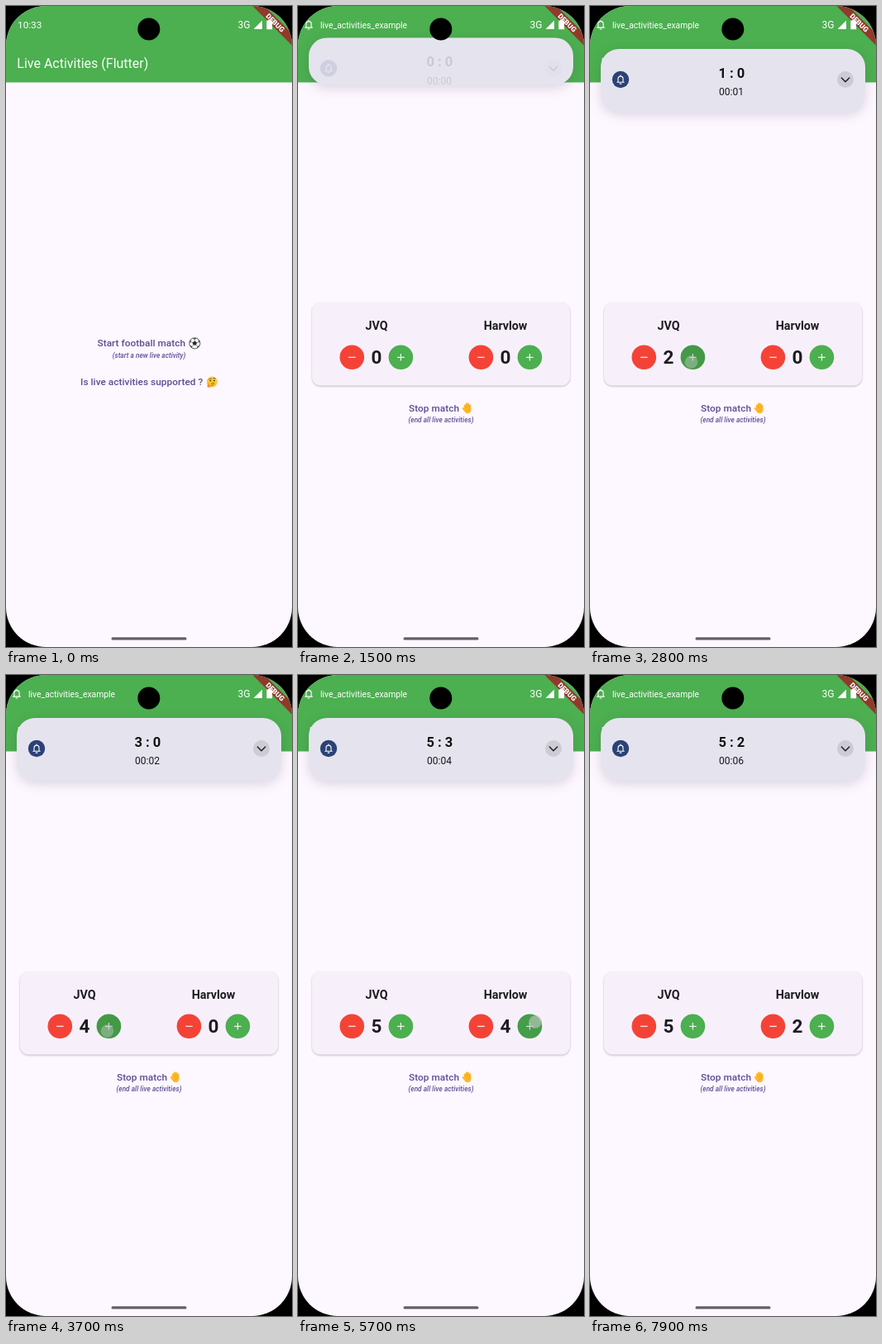
These frames come from a looping animation (346 by 776 pixels, 8000 ms). An HTML page:

```html
<!DOCTYPE html>
<html lang="en">
<head>
<meta charset="utf-8">
<title>Live score demo</title>
<style>
  html, body { margin: 0; width: 100%; height: 100%; overflow: hidden; background: #000; }
  svg { display: block; width: 100%; height: 100%; font-family: Roboto, sans-serif; }
  .white { fill: #fff; }
  .mid { text-anchor: middle; }
  .action { font-size: 11.8px; font-weight: 500; letter-spacing: .05px; fill: #5d4c94; }
  .note { font-size: 8.2px; font-weight: 500; font-style: italic; letter-spacing: .06px; fill: #5d4c94; text-anchor: middle; }
  .team { font-size: 14.3px; font-weight: 700; fill: #1d1b20; text-anchor: middle; }
  .count { font-size: 22.5px; font-weight: 700; fill: #1d1b20; text-anchor: middle; }
  .sign { stroke: #fff; stroke-width: 1.2; stroke-opacity: .9; }
  .line { fill: none; stroke-linecap: round; stroke-linejoin: round; }
  #card { filter: drop-shadow(0 1px 1px rgba(0, 0, 0, .25)); }
  #panel { filter: drop-shadow(0 4px 7px rgba(50, 35, 70, .16)); }
</style>
</head>
<body>
<svg viewBox="0 0 346 776" preserveAspectRatio="none">
  <defs>
    <clipPath id="screen"><rect width="346" height="776" rx="48"/></clipPath>
    <clipPath id="panelClip"><rect id="panelMask" x="13" y="52" width="320" height="76" rx="22"/></clipPath>
    <path id="bell" class="line" d="M-7 6H7M-5 6V-1a5 5 0 0 1 10 0V6M-1.5 9h3M0-8v2"/>
  </defs>

  <g clip-path="url(#screen)">
    <rect width="346" height="776" fill="#fdf7ff"/>
    <rect width="346" height="92.5" fill="#4caf50"/>
    <text x="13.3" y="75" font-size="16" fill="#f6fff6">Live Activities (Flutter)</text>

    <g id="home">
      <rect id="press" x="102" y="394" width="142" height="40" rx="20" fill="#65558f"/>
      <text class="action" x="110.5" y="412.3">Start football match</text>
      <g transform="translate(228.3 408.3)">
        <circle r="6.6" fill="#f4f4f4" stroke="#3b3b3f" stroke-width=".8"/>
        <path fill="#2c2c30" d="M0-2.8 2.7-.9 1.7 2.3h-3.4L-2.7-.9ZM-2.4-6.1H2.4L0-4.6ZM4.4-4.8 6.4-.6 4.6-1.6ZM6 2.5 3 6 3.2 3.7ZM-4.4-4.8-6.4-.6-4.6-1.6ZM-6 2.5-3 6-3.2 3.7Z"/>
        <path class="line" stroke="#55555a" stroke-width=".6" d="M0-2.8v-2M2.7-.9l2-.7M1.7 2.3l1.5 1.6M-1.7 2.3l-1.5 1.6M-2.7-.9l-2-.7"/>
      </g>
      <text class="note" x="173" y="425.6">(start a new live activity)</text>
      <text class="action" x="90" y="459.3">Is live activities supported ?</text>
      <g transform="translate(249.3 455)">
        <circle r="6.5" fill="#fcc932"/>
        <circle cx="-2" cy="-1.4" r=".95" fill="#4b3420"/>
        <circle cx="2.5" cy="-1.6" r=".95" fill="#4b3420"/>
        <path class="line" stroke="#6b4626" stroke-width=".8" d="M-3.6-3.4q1.2-.9 2.6-.2M1.4-4.4q1.4-.9 2.8.3M-.8 2.1q1.7-.9 3.4-.3"/>
        <path class="line" stroke="#e9962a" stroke-width="2" d="M-5 5.3q1.6 1 3.2-.5L2 3.2M-4.6 4.7V2.4"/>
      </g>
    </g>

    <g id="match">
      <rect id="card" x="17" y="359" width="312" height="100.5" rx="10" fill="#f7f0fb"/>
      <text class="team" x="95" y="392">JVQ</text>
      <text class="team" x="251" y="392">Harvlow</text>
      <g id="buttons"></g>
      <text class="count" id="left" x="95" y="433.2">0</text>
      <text class="count" id="right" x="251" y="433.2">0</text>
      <text class="action" x="134" y="490.6">Stop match</text>
      <g transform="translate(205 486.8)">
        <path class="line" stroke="#fcb92b" stroke-width="2.1" d="M-3.2 1V-3.6M-1 0V-5.4M1.2 0V-5M3.3 1V-3.2M-3.4 2.6-5.3.3"/>
        <path fill="#fcb92b" d="M-4.2 0H4.3V2.6Q4 6.4.3 6.4-2.8 6.4-4.3 2.6Z"/>
        <path class="line" stroke="#e08f1c" stroke-width=".5" d="M-2.1 0V-3M.1 0V-4M2.3 0V-3M-1.6 3.8Q.4 1.6 3 2"/>
      </g>
      <text class="note" x="173" y="503.8">(end all live activities)</text>
    </g>

    <g transform="translate(346 0) rotate(45)">
      <rect x="-40" y="23.6" width="80" height="10.1" fill="#8f3a2c"/>
      <text class="white mid" y="31.8" font-size="8.7" font-weight="900">DEBUG</text>
    </g>

    <text class="white" id="clock" x="14" y="27" font-size="11.8">10:33</text>
    <g id="ticker">
      <use href="#bell" transform="translate(13 22.4) scale(.62)" stroke="#fff" stroke-width="1.8"/>
      <text class="white" x="27" y="26.6" font-size="10.35">live_activities_example</text>
    </g>
    <text class="white" x="280.6" y="27" font-size="12">3G</text>
    <path class="white" d="M310 17.5V28H299.5ZM315.3 17.6h2v-1.4h2.8v1.4h2V28.2h-6.8Z"/>

    <g id="notice">
      <rect id="panel" x="13" y="52" width="320" height="76" rx="22" fill="#e5e4ee"/>
      <g clip-path="url(#panelClip)">
        <g id="content">
          <circle cx="37" cy="89" r="10.2" fill="#2b4277"/>
          <use href="#bell" transform="translate(37 88.7) scale(.6)" stroke="#fff" stroke-width="1.8"/>
          <text class="mid" id="score" x="171.3" y="87" font-size="16.5" font-weight="700" fill="#111"></text>
          <text class="mid" id="timer" x="171" y="108.2" font-size="12" fill="#17171a"></text>
          <circle cx="309" cy="89" r="10" fill="#cdccd5"/>
          <path class="line" stroke="#222226" stroke-width="1.5" d="M304.3 87l4.7 4.7 4.7-4.7"/>
        </g>
      </g>
    </g>

    <rect x="127.5" y="764.3" width="91" height="3.2" rx="1.6" fill="#655d69"/>
    <circle id="touch" r="7.6" fill="#cfcfcf" fill-opacity=".6" stroke="#a5a5a5" stroke-opacity=".5"/>
  </g>
  <circle cx="172.8" cy="28" r="13.5"/>
</svg>

<script>
const LOOP = 8000, MATCH_START = 1130, NOTICE_START = 1300, NOTICE_LAG = 280, TICK_PHASE = 1080;
const $ = id => document.getElementById(id);
const clamp = v => Math.min(1, Math.max(0, v));
const ramp = (t, from, length) => clamp((t - from) / length);

const buttons = [
  { x: 65.3, side: 'left', step: -1 },
  { x: 124.4, side: 'left', step: 1 },
  { x: 221.4, side: 'right', step: -1 },
  { x: 280.4, side: 'right', step: 1 }
];
$('buttons').innerHTML = buttons.map(({ x, step }) => `
  <g transform="translate(${x} 425.3)">
    <circle r="14.8" fill="${step > 0 ? '#4caf50' : '#f44336'}"/>
    <path class="sign" d="M-4.3 0H4.3${step > 0 ? 'M0-4.3V4.3' : ''}"/>
    <circle class="shade" r="14.8" opacity="0"/>
  </g>`).join('');
const shades = document.querySelectorAll('.shade');

const tap = (down, up, x, y, button) => ({ down, up, x, y, button });
const taps = [
  tap(900, 1060, 152.5, 410),
  tap(2000, 2100, 122.5, 431, 1),
  tap(2600, 2750, 122.5, 431, 1),
  tap(3050, 3150, 122.5, 431, 1),
  tap(3500, 3650, 122.5, 431, 1),
  tap(3900, 4000, 122.5, 431, 1),
  tap(4580, 4680, 286, 421, 3),
  tap(4860, 4950, 286, 421, 3),
  tap(5120, 5210, 287, 420, 3),
  tap(5640, 5690, 287, 420, 3),
  tap(6850, 6950, 223, 431, 2),
  tap(7300, 7420, 223, 431, 2)
];

// Rises while held, then fades after release.
const pressLevel = (t, { down, up }, rise, fade) => ramp(t, down, rise) * (1 - ramp(t, up, fade));

function goals(t, side) {
  return taps.reduce((sum, { up, button }) => {
    const b = buttons[button];
    return sum + (b && b.side === side && t >= up ? b.step : 0);
  }, 0);
}

const show = (id, on) => $(id).setAttribute('display', on ? 'inline' : 'none');

function render(t) {
  const noticed = t >= NOTICE_START;
  show('home', t < MATCH_START);
  show('match', t >= MATCH_START);
  show('clock', !noticed);
  show('ticker', noticed);
  show('notice', noticed);

  $('left').textContent = goals(t, 'left');
  $('right').textContent = goals(t, 'right');
  const late = t - NOTICE_LAG;
  $('score').textContent = `${goals(late, 'left')} : ${goals(late, 'right')}`;
  const seconds = Math.max(0, Math.floor((t - TICK_PHASE) / 1000));
  $('timer').textContent = '00:' + String(seconds).padStart(2, '0');

  const offset = -80 * (1 - ramp(t, NOTICE_START, 450)) ** 3;
  const height = 38 + 38 * ramp(t, NOTICE_START, 400);
  $('notice').setAttribute('transform', `translate(0 ${offset})`);
  $('panel').setAttribute('height', height);
  $('panelMask').setAttribute('height', height);
  $('content').setAttribute('opacity', ramp(t, 1460, 340));

  const current = taps.filter(p => p.down <= t).pop();
  $('touch').setAttribute('opacity', current ? pressLevel(t, current, 30, 160) : 0);
  if (current) $('touch').setAttribute('transform', `translate(${current.x} ${current.y})`);
  $('press').setAttribute('opacity', .05 * pressLevel(t, taps[0], 100, 200));
  shades.forEach((shade, i) => {
    const level = current && current.button === i ? pressLevel(t, current, 80, 450) : 0;
    shade.setAttribute('opacity', .14 * level);
  });
}

const start = performance.now();
function frame(now) {
  render(Math.max(0, now - start) % LOOP);
  requestAnimationFrame(frame);
}
render(0);
requestAnimationFrame(frame);
</script>
</body>
</html>
```
